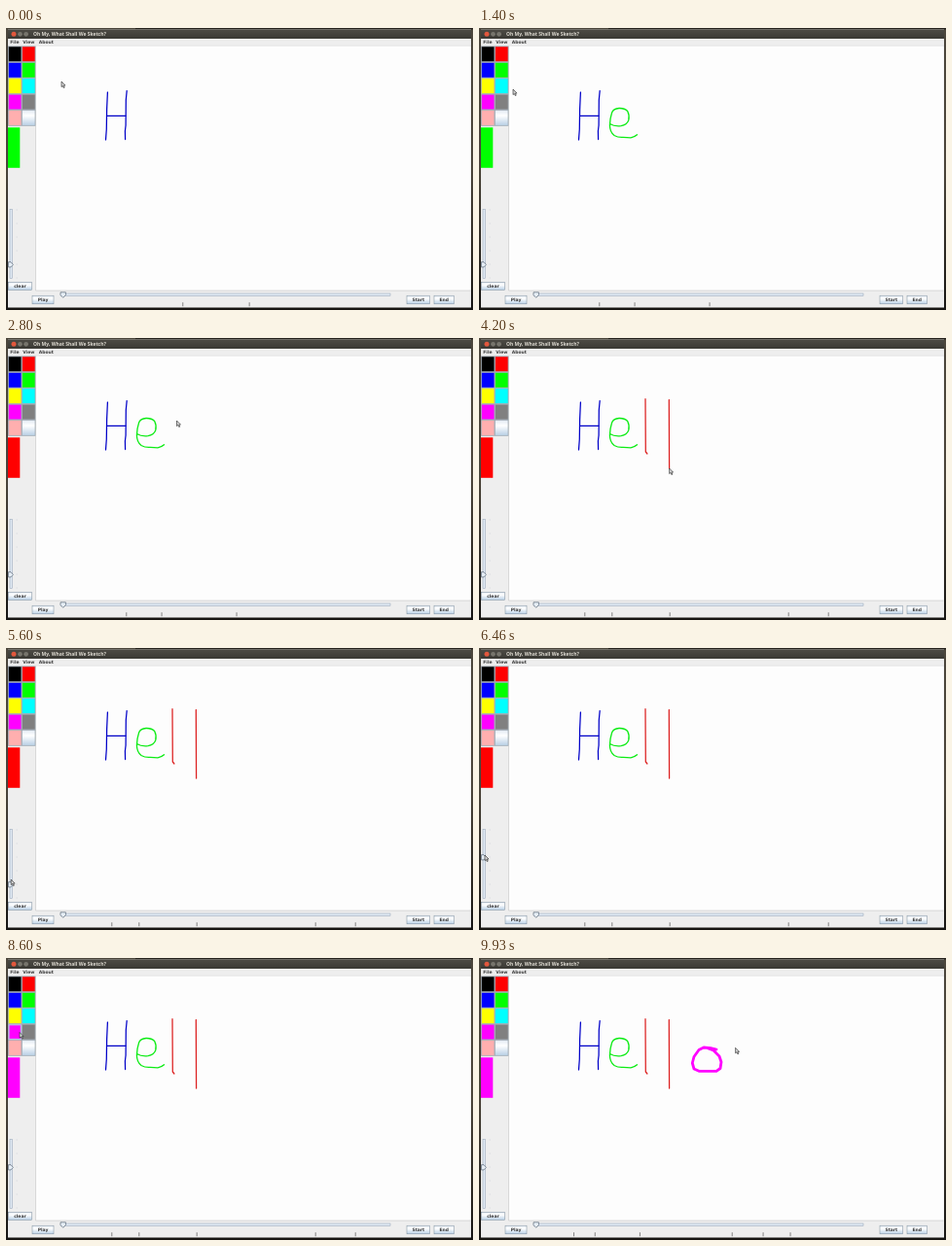
An HTML page for the animation above (10 s loop, 480 by 290 pixels).

```html
<!DOCTYPE html>
<html lang="en">
<head>
<meta charset="utf-8">
<title>Doodle</title>
<style>
  html, body { margin: 0; width: 100%; height: 100%; overflow: hidden; background: #25221e; }
  svg { display: block; width: 100%; height: 100%; }
  text { font: bold 4.5px "DejaVu Sans", sans-serif; fill: #3c3c3c; }
  .title { font: bold 5px "Open Sans", sans-serif; fill: #dfdbd2; }
  .button { fill: url(#metal); stroke: #7a8a99; stroke-width: .5; }
  .track { fill: #dfe8f2; stroke: #8fa0b3; stroke-width: .5; }
  .thumb { fill: #e6eef6; stroke: #566575; stroke-width: .7; }
  #ink path { fill: none; stroke-linecap: round; stroke-linejoin: round; }
  #marks { stroke: #555; stroke-width: .7; }
  #hover { fill: none; stroke: #b8cfe5; stroke-width: 1; }
</style>
</head>
<body>
<svg viewBox="0 0 480 290">
  <defs>
    <linearGradient id="metal" x2="0" y2="1">
      <stop stop-color="#e3ebf4"/><stop offset=".35" stop-color="#fff"/><stop offset="1" stop-color="#b8cfe5"/>
    </linearGradient>
    <linearGradient id="desk" x2="0" y2="1">
      <stop stop-color="#4b453b"/><stop offset=".5" stop-color="#4a443a"/><stop offset="1" stop-color="#171512"/>
    </linearGradient>
    <linearGradient id="bar" x2="0" y2="1">
      <stop stop-color="#4d4b45"/><stop offset="1" stop-color="#3a3934"/>
    </linearGradient>
  </defs>

  <rect width="480" height="290" fill="url(#desk)"/>
  <rect x="133" width="347" height="1.5" fill="#25221d"/>
  <rect x="2" y="1.5" width="476" height="286" fill="#eee"/>
  <rect x="2" y="1.5" width="476" height="9.5" fill="url(#bar)"/>
  <circle cx="8" cy="6.3" r="2.5" fill="#e2573d"/>
  <circle cx="14.5" cy="6.3" r="2.4" fill="#77756d"/>
  <circle cx="20.6" cy="6.3" r="2.4" fill="#77756d"/>
  <text class="title" x="28" y="8.2">Oh My, What Shall We Sketch?</text>
  <text x="4.3" y="16.2">File</text>
  <text x="17.2" y="16.2">View</text>
  <text x="33.8" y="16.2">About</text>
  <path d="M2 18.3H478" stroke="#ccc" stroke-width=".5"/>
  <rect x="30.5" y="18.6" width="447" height="251.4" fill="#fdfdfd"/>
  <path d="M30.5 18.6V270H477.5" fill="none" stroke="#c4c4c4" stroke-width=".6"/>

  <g id="swatches"></g>
  <rect id="hover" width="12.3" height="14.6"/>
  <rect id="current" x="2" y="102.3" width="12.3" height="41.5"/>

  <rect class="track" x="4" y="186.5" width="2.4" height="71"/>
  <path d="M10.5 187h1.3m-1.3 14h1.3m-1.3 14h1.3m-1.3 14h1.3m-1.3 14h1.3m-1.3 14h1.3" stroke="#c5ccd4" stroke-width=".6"/>
  <path id="thumb" class="thumb" d="M2.4-2.6H5L7.4 0 5 2.6H2.4z"/>
  <rect class="track" x="56.5" y="273" width="338.5" height="2.6"/>
  <path class="thumb" d="M56 271.8h5.4v2.8l-2.7 2.7-2.7-2.7z"/>
  <g id="buttons"></g>
  <g id="marks"></g>
  <g id="ink"></g>
  <path id="cursor" d="M0 0V5.6L1.3 4.5 2.3 6.6 3.2 6.2 2.3 4.1H4z" fill="#d4d4d4" stroke="#222" stroke-width=".6"/>
</svg>
<script>
const $ = id => document.getElementById(id);
const LOOP = 10000, FPS = 15;

function add(parent, tag, attrs, text = '') {
  const el = document.createElementNS('http://www.w3.org/2000/svg', tag);
  for (const name in attrs) el.setAttribute(name, attrs[name]);
  el.textContent = text;
  return parent.appendChild(el);
}

const GRID = { x: 2.4, y: 19, dx: 14.1, dy: 16.4 };
const palette = ['#000', '#f00', '#00f', '#0f0', '#ff0', '#0ff', '#f0f', '#808080', '#ffafaf', 'url(#metal)'];
palette.forEach((fill, i) => add($('swatches'), 'rect', {
  x: GRID.x + i % 2 * GRID.dx, y: GRID.y + (i >> 1) * GRID.dy, width: 13.5, height: 15.7,
  fill, stroke: '#9aa5b0', 'stroke-width': .7
}));

[['clear', 2.3, 261.3, 24.2, 8], ['Play', 27, 275.2, 22, 8.6],
 ['Start', 412, 275.2, 23.6, 8.6], ['End', 440, 275.2, 20.4, 8.6]].forEach(([label, x, y, width, height]) => {
  add($('buttons'), 'rect', { class: 'button', x, y, width, height });
  add($('buttons'), 'text', { x: x + width / 2, y: y + height / 2 + 1.7, 'text-anchor': 'middle' }, label);
});

// Each stroke: path, colour, width, start and end in seconds, end position on the recording timeline.
const strokes = [
  ['M104.4 66L103.6 84 103.3 104 102.5 115', '#0000c8', 1.25, -2, -1, 50.6],
  ['M124.2 64.5L123.3 74 123.1 100 122.4 106 122.6 114.6', '#0000c8', 1.25, -2, -1, 78.6],
  ['M104 90.3H123', '#0000c8', 1.25, -2, -1, 138],
  ['M134.5 98.5Q139 101.5 146 100.7Q152 99.5 153.7 95Q155 90 152.7 85.5Q149.5 82.3 144 82.5Q138 83 136.6 87Q134.6 93 134.4 100Q134.5 107 139 110.5Q143 112.8 148 112.4L156 112.9Q160 112 162.5 109.7', '#0cec14', 1.3, .46, 1.14, 260],
  ['M171 62.7L171.3 117 172.9 119', '#dc1e1e', 1.25, 3, 3.4, 301],
  ['M195.3 63.5L195.6 134', '#dc1e1e', 1.25, 3.73, 4.2, 337],
  ['M244 94L238 92.6 231 92 226 94.5 221 101.5 219.3 108 221 114 226 116.3H244L248 113.5 249 107 247 101 241 95 235 92.6', '#f0f', 2.8, 9.06, 9.6, 433.7]
].map(([d, stroke, width, from, to, end]) => {
  const path = add($('ink'), 'path', { d, stroke, 'stroke-width': width });
  return { path, from, to, end, length: path.getTotalLength() };
});
const marks = strokes.slice(1).map(() => add($('marks'), 'path', {}));

// Cursor stops: seconds, x, y.
const stops = [
  [0, 57, 55], [.46, 134.5, 98.5], [1.14, 162.5, 109.7], [1.4, 35, 63], [2.13, 27, 38],
  [2.2, 24, 27], [2.4, 24, 27], [2.8, 175.5, 85], [3, 171, 62.7], [3.4, 172.9, 119],
  [3.73, 195.3, 63.5], [4.2, 195.6, 134], [5.33, 6, 240], [5.6, 5.2, 238], [5.8, 5.2, 241],
  [6.4, 5.2, 214], [6.46, 6, 213], [6.54, 6, 213], [7.13, 24.5, 57.5], [7.34, 24.5, 57.5],
  [7.8, 14, 75], [8.53, 14, 76], [8.6, 14, 76.5], [9.06, 244, 94], [9.6, 235, 92.6], [9.93, 263.6, 92.3], [10, 263.6, 92.3]
];

const clamp = v => Math.min(1, Math.max(0, v));
const ease = v => v * v * (3 - 2 * v);
const progress = (t, from, to) => clamp((t - from) / (to - from));

function cursorAt(t) {
  const drawing = strokes.find(s => t >= s.from && t < s.to);
  if (drawing) {
    const { x, y } = drawing.path.getPointAtLength(drawing.length * progress(t, drawing.from, drawing.to));
    return [x, y];
  }
  const i = Math.max(1, stops.findIndex(s => s[0] >= t));
  const [t0, x0, y0] = stops[i - 1], [t1, x1, y1] = stops[i];
  const k = ease(progress(t, t0, t1));
  return [x0 + (x1 - x0) * k, y0 + (y1 - y0) * k];
}

function drawHover([x, y]) {
  const column = Math.floor((x - GRID.x) / GRID.dx), row = Math.floor((y - GRID.y) / GRID.dy);
  const inside = column >= 0 && column < 2 && row >= 0 && row < 5;
  $('hover').setAttribute('visibility', inside ? 'visible' : 'hidden');
  $('hover').setAttribute('x', GRID.x + .6 + column * GRID.dx);
  $('hover').setAttribute('y', GRID.y + .6 + row * GRID.dy);
}

function draw(t) {
  for (const { path, from, to, length } of strokes) {
    const p = progress(t, from, to);
    path.setAttribute('visibility', p ? 'visible' : 'hidden');
    path.setAttribute('stroke-dasharray', p < 1 ? `${p * length} ${length * 2}` : 'none');
  }
  const done = strokes.filter(s => t >= s.to);
  const total = done[done.length - 1].end;
  marks.forEach((mark, i) => {
    mark.setAttribute('d', i < done.length - 1 ? `M${58.2 + 337 * done[i].end / total} 282.2v4` : '');
  });
  $('current').setAttribute('fill', t < 2.3 ? '#0f0' : t < 8 ? '#f00' : '#f0f');
  $('thumb').setAttribute('transform', `translate(0 ${243.3 - 28 * ease(progress(t, 5.8, 6.4))})`);
  const cursor = cursorAt(t);
  $('cursor').setAttribute('transform', `translate(${cursor})`);
  drawHover(cursor);
}

function tick() {
  const ms = performance.now() % LOOP;
  draw(Math.min(149, Math.floor(ms * FPS / 1000 + .105)) / FPS);
  requestAnimationFrame(tick);
}
tick();
</script>
</body>
</html>
```
